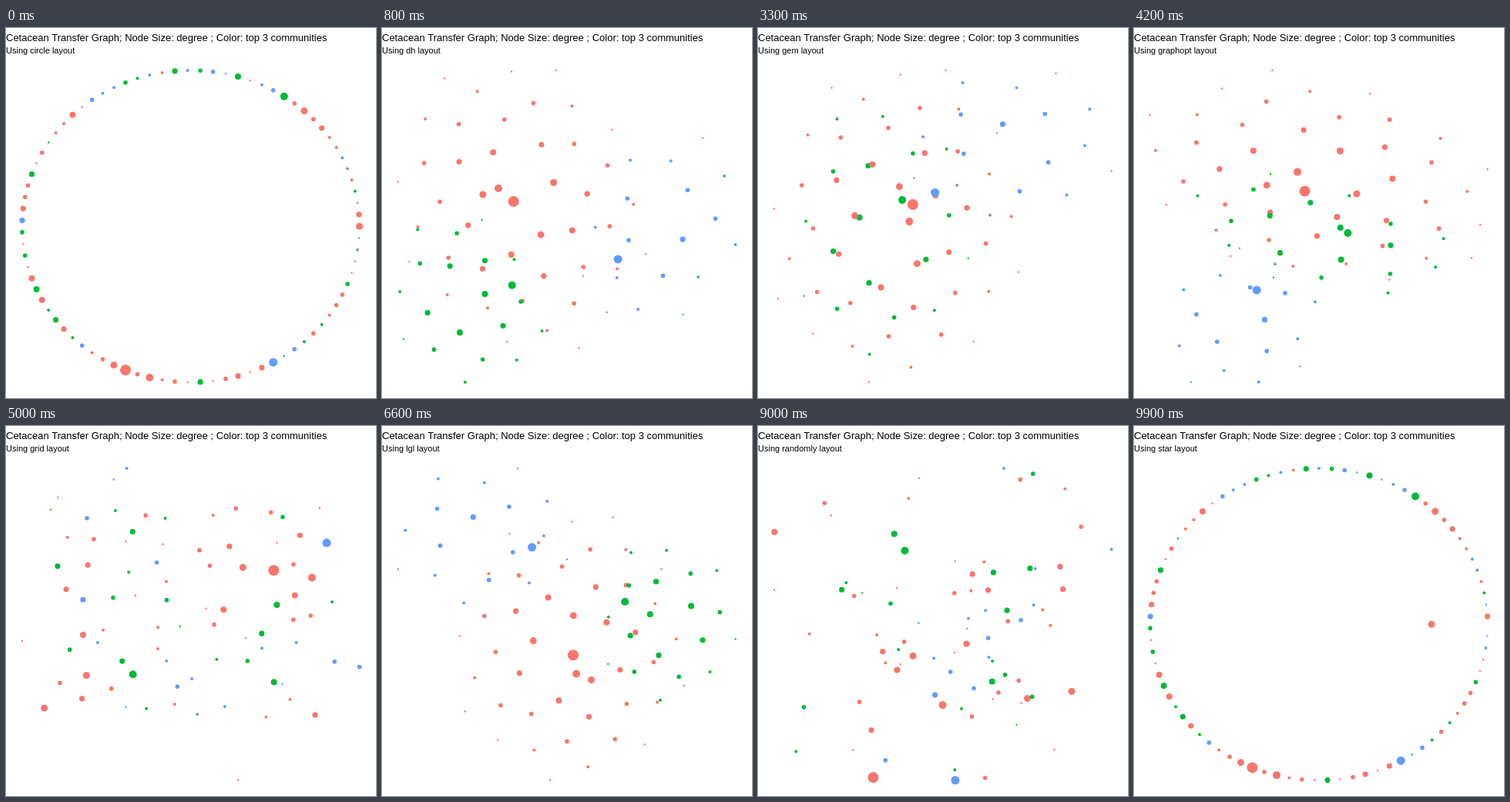
An HTML page with a canvas that plays this animation: 480 by 480 pixels, repeating every 10000 ms.

```html
<!DOCTYPE html>
<html lang="en">
<head>
<meta charset="utf-8">
<title>Graph layouts</title>
<style>
html, body { margin: 0; width: 100%; height: 100%; overflow: hidden; background: #fff; }
canvas { display: block; width: 480px; height: 480px; }
</style>
</head>
<body>
<canvas id="stage" width="480" height="480"></canvas>
<script>
const ctx = document.getElementById('stage').getContext('2d');
const COUNT = 83, TAU = Math.PI * 2, GOLDEN = 2.4, LOOP = 10000, STEP = 100;
const nodes = [...Array(COUNT).keys()];

const green = [3, 13, 17, 20, 22, 25, 26, 34, 37, 42, 44, 47, 49, 50, 52, 63, 70, 72, 74, 78];
const blue = [2, 5, 6, 14, 15, 18, 19, 21, 24, 27, 28, 29, 41, 53, 69, 71, 81, 82];
const red = nodes.filter(i => !green.includes(i) && !blue.includes(i));
const communities = [red, green, blue];
const palette = ['#F8766D', '#00BA38', '#619CFF'];
const colors = nodes.map(i => palette[communities.findIndex(c => c.includes(i))]);

// Nodes whose radius differs from the usual 2.
const sizes = [
  [1.2, [2, 16, 18, 30, 34, 36, 43, 45, 62, 64, 67, 70, 79, 80, 82]],
  [2.8, [10, 12, 14, 19, 20, 26, 29, 35, 38, 39, 42, 44, 53, 55, 58, 61, 65, 71, 73, 76, 77, 78]],
  [3.6, [1, 9, 22, 37, 40, 41, 50, 51, 63, 66, 68]],
  [4, [17, 31, 46, 47, 48]],
  [4.5, [0, 11, 56]],
  [5, [13, 59]],
  [5.5, [69]],
  [7, [57]]];
const radii = nodes.map(i => (sizes.find(([, list]) => list.includes(i)) || [2])[0]);
communities.forEach(c => c.sort((a, b) => radii[b] - radii[a]));

// Each community fills an ellipse, large nodes inside and small ones at the rim.
function force(spread, ellipses, hubs) {
  const points = [];
  communities.forEach((community, c) => {
    const [cx, cy, rx, ry] = ellipses[c];
    community.forEach((i, k) => {
      const r = Math.sqrt((k + .5) / community.length), a = k * GOLDEN + c;
      points[i] = hubs[i] || [cx + rx * r * Math.cos(a), cy + ry * r * Math.sin(a)];
    });
  });
  return points.map(([x, y]) => [(x - 240) * spread, (y - 257) * spread]);
}

const turn = (points, a, s) => points.map(([x, y]) =>
  [(x * Math.cos(a) - y * Math.sin(a)) * s, (x * Math.sin(a) + y * Math.cos(a)) * s]);
const ring = (i, n) => [Math.cos(TAU * i / n), -Math.sin(TAU * i / n)];

let seed = 11;
const random = () => (seed = seed * 16807 % 2147483647) / 2147483647 * 2 - 1;

const fr = force(.037,
  [[240, 215, 219, 130], [190, 165, 120, 110], [135, 375, 85, 85]],
  { 57: [268, 224], 59: [284, 224], 13: [180, 180], 69: [162, 350] });
const gem = force(20,
  [[180, 255, 160, 203], [165, 255, 110, 170], [322, 155, 136, 98]],
  { 57: [201, 229], 59: [197, 250], 13: [187, 222], 69: [229, 211] });
const lgl = force(1,
  [[250, 285, 150, 175], [370, 250, 88, 110], [140, 150, 119, 95]],
  { 57: [253, 293], 59: [257, 316], 13: [316, 227], 69: [202, 161] });
const nicely = force(.037,
  [[155, 257, 134, 202], [225, 225, 70, 155], [355, 270, 103, 85]],
  { 57: [175, 264], 59: [154, 280], 13: [210, 203], 69: [314, 270] });

const strays = { 16: [.05, 6.7], 19: [2.3, -1], 30: [-2.6, 1], 81: [2.5, -1.3] };
const kk = nodes.map(i => strays[i] || [random() * .9 - .2, random() * .8]);

// Each layout keeps its own scale; "until" is when its rest ends.
const layouts = [
  { name: 'circle', until: 600, points: nodes.map(i => ring(i, COUNT)) },
  { name: 'dh', until: 1500, points: turn(lgl, 2.4, .4) },
  { name: 'fr', until: 2400, points: fr },
  { name: 'gem', until: 3300, points: gem },
  { name: 'graphopt', until: 4200, points: turn(nicely, 1.9, 30) },
  { name: 'grid', until: 5000, points: nodes.map(i => [i % 10, -.942 * Math.floor(i / 10)]) },
  { name: 'kk', until: 5800, points: kk },
  { name: 'lgl', until: 6600, points: lgl },
  { name: 'mds', until: 7400, points: turn(fr, 2.8, .4) },
  { name: 'nicely', until: 8200, points: nicely },
  { name: 'randomly', until: 9000, points: nodes.map(() => [random(), random()]) },
  { name: 'star', until: 9800, points: nodes.map(i => i ? ring(i - 1, COUNT - 1) : [0, 0]) }
];

function fit(values, low, high) {
  const min = Math.min(...values), max = Math.max(...values);
  return values.map(v => low + (v - min) / (max - min) * (high - low));
}

function write(text, size, baseline) {
  ctx.font = `${size}px "Liberation Sans", Arial, sans-serif`;
  ctx.fillText(text, 0, baseline);
}

function draw(time) {
  const t = time % LOOP;
  const index = layouts.findIndex(l => t < l.until + 2 * STEP);
  const from = layouts[index], to = layouts[(index + 1) % layouts.length];
  const mix = t < from.until ? 0 : (Math.floor((t - from.until) / STEP) + 1) / 3;
  const blend = axis => nodes.map(i =>
    from.points[i][axis] * (1 - mix) + to.points[i][axis] * mix);
  const xs = fit(blend(0), 21, 458.5), ys = fit(blend(1), 55, 459.5);

  ctx.fillStyle = '#fff';
  ctx.fillRect(0, 0, 480, 480);
  ctx.fillStyle = '#000';
  write('Cetacean Transfer Graph; Node Size: degree ; Color: top 3 communities', 13, 17);
  write(`Using ${from.name} layout`, 11, 33);
  for (const i of nodes) {
    ctx.fillStyle = colors[i];
    ctx.beginPath();
    ctx.arc(xs[i], ys[i], radii[i], 0, TAU);
    ctx.fill();
  }
}

const start = performance.now();
function tick() {
  draw(performance.now() - start);
  requestAnimationFrame(tick);
}
tick();
</script>
</body>
</html>
```
